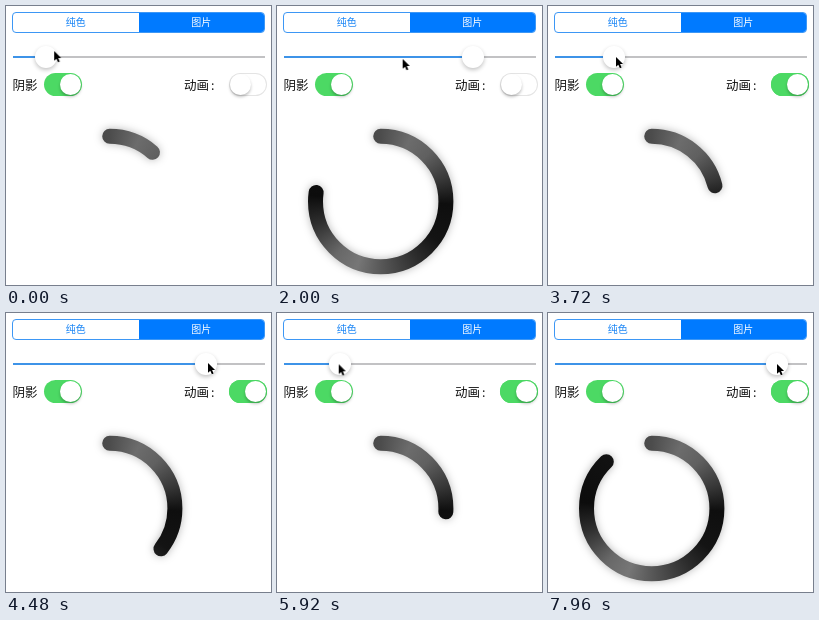
An HTML page with a canvas for the animation above (8000 ms loop, 265 px wide and 279 px high).

```html
<!DOCTYPE html>
<html lang="zh-CN">
<head>
<meta charset="utf-8">
<title>圆环进度</title>
<style>
@property --x { syntax: '<length>'; inherits: true; initial-value: 40px; }
@property --end { syntax: '<number>'; inherits: false; initial-value: 41; }

html, body { margin: 0; width: 100%; height: 100%; overflow: hidden; background: #fff; }
body { position: relative; font-family: "Noto Sans CJK SC", "Noto Sans CJK", sans-serif; color: #111; }
body > *, .slider > *, .switch::after { position: absolute; box-sizing: border-box; }

.tabs {
  left: 6px; top: 6px; width: 253px; height: 21px; display: flex; overflow: hidden;
  border: 1px solid #3d97f5; border-radius: 4px;
  font-size: 10px; line-height: 18px; text-align: center; color: #1482f5;
}
.tabs span { flex: 1; }
.tabs .active { background: #007aff; color: #fff; }

.slider { left: 0; top: 51px; animation: slide 8s linear infinite; }
.track, .fill { left: 7px; top: -1px; height: 2px; }
.track { width: 252px; background: #c2c2c4; }
.fill { width: calc(var(--x) - 7px); background: #3d93e8; }
.thumb {
  left: calc(var(--x) - 11px); top: -11px; width: 22px; height: 22px; border-radius: 50%;
  background: #fff; box-shadow: 0 2px 4px rgba(0, 0, 0, .24);
}

.label { top: 69px; font-size: 12.5px; line-height: 20px; white-space: nowrap; }
.label span { margin-left: 2px; }

.switch { top: 67px; width: 38px; height: 23px; border-radius: 12px; background: #4cd964; }
.switch::after {
  content: ""; left: 16px; top: 1px; width: 21px; height: 21px; border-radius: 50%;
  background: #fff; box-shadow: 0 2px 3px rgba(0, 0, 0, .25);
}
.motion { animation: track-on 8s linear infinite; }
.motion::after { animation: knob-on 8s linear infinite; }

#ring { left: 0; top: 0; width: 265px; height: 279px; animation: sweep 8s linear infinite; }
.cursor { left: 0; top: 0; width: 8.5px; height: 12.75px; overflow: visible; animation: point 8s linear infinite; }

@keyframes slide {
  0% { --x: 40px; }
  12% { --x: 190px; }
  13%, 25.2% { --x: 195.5px; }
  28%, 50.5% { --x: 66px; }
  55%, 62% { --x: 200px; }
  65%, 77.5% { --x: 63px; }
  83% { --x: 204px; }
  84%, 100% { --x: 229px; }
}
@keyframes sweep {
  0% { --end: 41; }
  12% { --end: 270; }
  13%, 25.2% { --end: 278; }
  28%, 51.2% { --end: 76; }
  63.2% { --end: 211; }
  75.8%, 77.7% { --end: 70; }
  100% { --end: 323; }
}
@keyframes point {
  0% { transform: translate(48px, 45px); }
  12% { transform: translate(194px, 53px); }
  13%, 23.6% { transform: translate(197px, 53px); }
  25% { transform: translate(126px, 53px); }
  27%, 31% { transform: translate(68px, 52px); }
  35.5%, 38% { transform: translate(240px, 77px); }
  43%, 50% { transform: translate(68px, 51px); }
  54.5%, 61.5% { transform: translate(202px, 50px); }
  64.5%, 65.5% { transform: translate(61px, 52px); }
  77% { transform: translate(62px, 51px); }
  83% { transform: translate(214px, 49px); }
  83.6% { transform: translate(229px, 50px); }
  100% { transform: translate(229px, 51px); }
}
@keyframes track-on {
  0%, 37% { background: #fff; box-shadow: inset 0 0 0 1px #e4e4e4; }
  39.5%, 100% { background: #4cd964; box-shadow: inset 0 0 0 1px #4cd964; }
}
@keyframes knob-on {
  0%, 37% { transform: translateX(-15px); }
  39.5%, 100% { transform: none; }
}
</style>
</head>
<body>
<div class="tabs"><span>纯色</span><span class="active">图片</span></div>
<div class="slider"><div class="track"></div><div class="fill"></div><div class="thumb"></div></div>
<div class="label" style="left:6.5px">阴影</div>
<div class="switch" style="left:38px"></div>
<div class="label" style="left:178px">动画<span>:</span></div>
<div class="switch motion" style="left:223px"></div>
<canvas id="ring"></canvas>
<svg class="cursor" viewBox="0 0 10 15">
  <path d="M0 0V11.5L2.7 9L4.6 13.3L6.6 12.4L4.8 8.3H8.3Z" stroke="#fff" stroke-width="1" paint-order="stroke"/>
</svg>
<script>
const ring = document.getElementById('ring');
const ctx = ring.getContext('2d');
const style = getComputedStyle(ring);
const scale = window.devicePixelRatio || 1;
const cx = 103.7, cy = 195.5, radius = 65.2, start = -Math.PI / 2;
ring.width = 265 * scale;
ring.height = 279 * scale;

// Brushed metal: [degrees from the top, grey level]
const metal = ctx.createConicGradient(start, cx, cy);
const tones = [[0, 76], [25, 108], [45, 96], [70, 56], [92, 14], [125, 20], [150, 48],
  [180, 88], [200, 118], [220, 104], [250, 48], [275, 12], [320, 18], [345, 70], [360, 76]];
for (const [deg, grey] of tones) metal.addColorStop(deg / 360, `rgb(${grey},${grey},${grey})`);

function draw() {
  const end = parseFloat(style.getPropertyValue('--end'));
  ctx.setTransform(scale, 0, 0, scale, 0, 0);
  ctx.clearRect(0, 0, 265, 279);
  ctx.lineWidth = 15;
  ctx.lineCap = 'round';
  ctx.strokeStyle = metal;
  ctx.shadowColor = 'rgba(0,0,0,.28)';
  ctx.shadowBlur = 8 * scale;
  ctx.beginPath();
  ctx.arc(cx, cy, radius, start, start + end * Math.PI / 180);
  ctx.stroke();
  requestAnimationFrame(draw);
}
draw();
</script>
</body>
</html>
```
